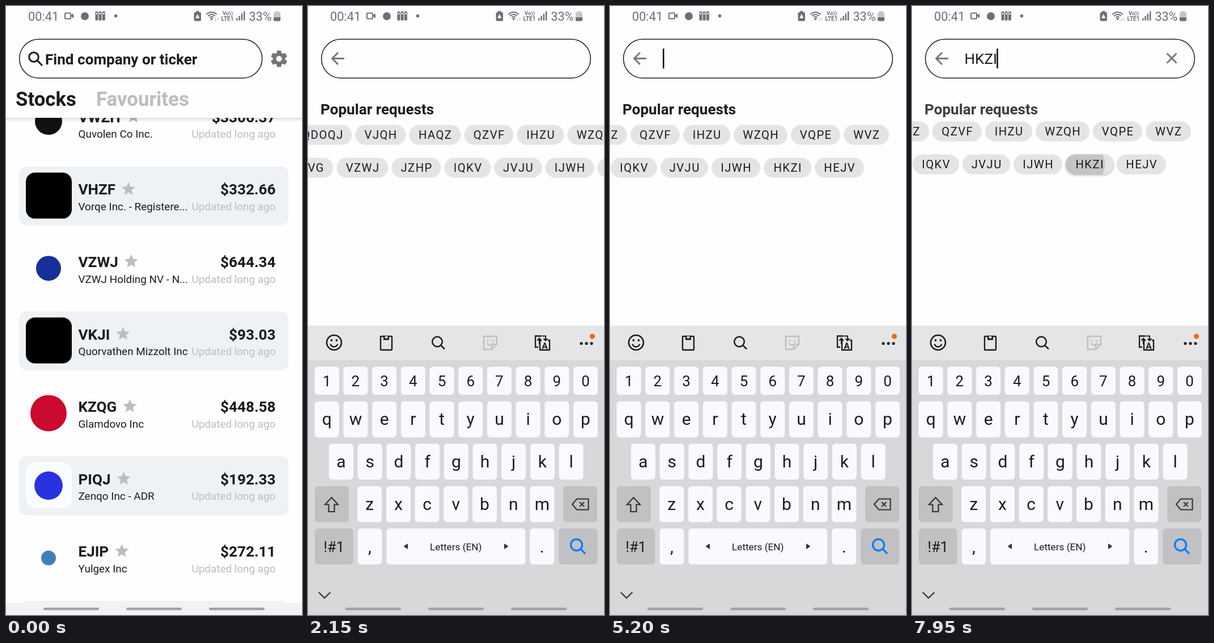
Write an HTML page with a canvas that moves like this. It is 522 px wide and 1073 px high and loops after 8000 ms.

```html
<!DOCTYPE html>
<html lang="en">
<head>
<meta charset="utf-8">
<title>Stock search</title>
<style>
html, body { margin: 0; width: 100%; height: 100%; overflow: hidden; background: #fefdff; }
canvas { display: block; width: 100vw; height: 100vh; }
</style>
</head>
<body>
<canvas id="stage" width="522" height="1073"></canvas>
<script>
const c = document.getElementById('stage').getContext('2d');
const LOOP = 8000;
const BG = '#fefdff', INK = '#1b1b1d', GREY = '#757577', PALE = '#bdbdc0', CARD = '#eef2f4';

const stocks = [
  { id: 'VWZH', name: 'Quvolen Co Inc.', price: '$3306.37', color: '#111', r: 24, dy: -4 },
  { id: 'VHZF', name: 'Vorqe Inc. - Registere...', price: '$332.66', color: '#000' },
  { id: 'VZWJ', name: 'VZWJ Holding NV - N...', price: '$644.34', color: '#16309a', r: 22 },
  { id: 'VKJI', name: 'Quorvathen Mizzolt Inc', price: '$93.03', color: '#000' },
  { id: 'KZQG', name: 'Glamdovo Inc', price: '$448.58', color: '#cc092f', r: 32 },
  { id: 'PIQJ', name: 'Zenqo Inc - ADR', price: '$192.33', color: '#2932e1', r: 25, tile: '#fbfcfe' },
  { id: 'EJIP', name: 'Yulgex Inc', price: '$272.11', color: '#3f7fb8', r: 13 },
  { id: 'QWHF', name: 'Ostrevan Inc', price: '$118.40', color: '#345', r: 20 }
];
const found = { id: 'VQPE', name: 'Vyqon Inc', price: '$483.61', color: '#f3200f', r: 26, dx: 4, dy: 2 };

const chipRows = [
  [['PKHQ', 91], ['QDOQ', 93], ['QDOQJ', 104], ['VJQH', 89], ['HAQZ', 91],
   ['QZVF', 87], ['IHZU', 83], ['WZQH', 95], ['VQPE', 87], ['WVZ', 80]],
  [['WFJI', 83], ['DZKH', 90], ['IZVG', 82], ['VZWJ', 91], ['JZHP', 87],
   ['IQKV', 82], ['JVJU', 84], ['IJWH', 86], ['HKZI', 84], ['HEJV', 87]]
];

const clamp = v => Math.min(1, Math.max(0, v));
const span = (t, a, b) => clamp((t - a) / (b - a));
const easeOut = p => 1 - (1 - p) ** 3;
const easeBoth = p => p * p * (3 - 2 * p);

function text(s, x, y, size, color = INK, weight = 400, align = 'left', gap = 0) {
  c.font = `${weight} ${size}px Roboto, sans-serif`;
  c.letterSpacing = gap + 'px';
  c.textAlign = align;
  c.fillStyle = color;
  c.fillText(s, x, y);
  const w = c.measureText(s).width;
  c.letterSpacing = '0px';
  return w;
}
function box(x, y, w, h, r, color) {
  c.beginPath();
  c.roundRect(x, y, w, h, r);
  c.fillStyle = color;
  c.fill();
}
function frame(x, y, w, h, r, color, lw) {
  c.beginPath();
  c.roundRect(x, y, w, h, r);
  c.strokeStyle = color;
  c.lineWidth = lw;
  c.stroke();
}
function disc(x, y, r, color) {
  c.beginPath();
  c.arc(x, y, r, 0, Math.PI * 2);
  c.fillStyle = color;
  c.fill();
}
function arc(x, y, r, color, lw, a = 0, b = Math.PI * 2) {
  c.beginPath();
  c.arc(x, y, r, a, b);
  c.strokeStyle = color;
  c.lineWidth = lw;
  c.stroke();
}
function line(color, lw, pts, closed) {
  c.beginPath();
  pts.forEach(p => c.lineTo(p[0], p[1]));
  if (closed) c.closePath();
  c.strokeStyle = color;
  c.lineWidth = lw;
  c.stroke();
}
function poly(color, pts) {
  c.beginPath();
  pts.forEach(p => c.lineTo(p[0], p[1]));
  c.closePath();
  c.fillStyle = color;
  c.fill();
}
function faded(alpha, draw) {
  if (alpha <= 0) return;
  c.save();
  c.globalAlpha *= alpha;
  draw();
  c.restore();
}
function lens(x, y, r, reach, color, lw) {
  arc(x, y, r, color, lw);
  line(color, lw, [[x + r * .72, y + r * .72], [x + reach, y + reach]]);
}

function star(x, y) {
  const pts = [];
  for (let i = 0; i < 10; i++) {
    const r = i % 2 ? 5.7 : 12.6, a = i * Math.PI / 5 - Math.PI / 2;
    pts.push([x + r * Math.cos(a), y + 1 + r * Math.sin(a)]);
  }
  poly(PALE, pts);
}
function gear(x, y) {
  c.save();
  c.translate(x, y);
  for (let i = 0; i < 3; i++) {
    box(-4, -14.5, 8, 29, 1.5, GREY);
    c.rotate(Math.PI / 3);
  }
  c.restore();
  disc(x, y, 11, GREY);
  disc(x, y, 5, BG);
}

function stockCard(s, y, shaded) {
  if (shaded) box(23, y, 475.5, 104, 14, CARD);
  if (s.tile) box(35, y + 11, 81, 81, 16, s.tile);
  if (s.r) disc(75 + (s.dx || 0), y + 52 + (s.dy || 0), s.r, s.color);
  else box(35, y + 11, 81, 81, 16, s.color);
  const w = text(s.id, 127.5, y + 49.7, 26.1, INK, 700);
  star(127.5 + w + 23, y + 39);
  text(s.price, 475.5, y + 49.7, 26.1, INK, 700, 'right');
  text(s.name, 127.5, y + 77.3, 18.9);
  text('Updated long ago', 475.5, y + 77.3, 18.9, PALE, 400, 'right');
}

function home(t) {
  const scroll = 5 * easeOut(span(t, 30, 400)) + easeBoth(span(t, 550, 850));
  stocks.forEach((s, i) => stockCard(s, 155 + 127.6 * i - scroll, i % 2));
  c.fillStyle = BG;
  c.fillRect(0, 0, 522, 197);
  const g = c.createLinearGradient(0, 197, 0, 204);
  g.addColorStop(0, 'rgba(0,0,0,.13)');
  g.addColorStop(1, 'rgba(0,0,0,0)');
  c.fillStyle = g;
  c.fillRect(0, 197, 522, 7);
  lens(49, 90, 8.3, 15, INK, 3);
  text('Find company or ticker', 69, 103, 26.1, INK, 700);
  gear(481.5, 93);
  text('Stocks', 17, 175.5, 34.8, INK, 700);
  text('Favourites', 159, 175.5, 34.8, PALE, 700);
  c.fillStyle = '#f2f2f4';
  c.fillRect(0, 1051, 522, 22);
}

function chipScroll(t) {
  return 317 * easeOut(span(t, 1830, 2650))
    + 134 * easeOut(span(t, 2780, 3550))
    + 34 * easeOut(span(t, 3680, 3900));
}

function chip(label, x, y, w, press) {
  if (press > 0) {
    c.save();
    c.shadowColor = 'rgba(0,0,0,.3)';
    c.shadowBlur = 4;
    c.shadowOffsetY = 1.5;
    box(x, y, w, 35, 17.5, '#e4e3e6');
    c.restore();
    c.save();
    c.beginPath();
    c.roundRect(x, y, w, 35, 17.5);
    c.clip();
    disc(x + 29, y + 18, 8 + 32 * press, 'rgba(0,0,0,.14)');
    c.restore();
  } else {
    box(x, y, w, 35, 17.5, '#e4e3e6');
  }
  text(label, x + w / 2 + .7, y + 24.4, 20.3, INK, 400, 'center', 1.4);
}

function popular(t, press, pressed) {
  const lift = 6 * easeBoth(span(press, 200, 350));
  faded(1 - lift * .025, () => text('Popular requests', 22, 191, 26.1, INK, 700));
  chipRows.forEach((row, j) => {
    let x = 23 - chipScroll(t);
    for (const [label, w] of row) {
      const hit = label === pressed ? span(press, 40, 350) : 0;
      if (x < 522 && x + w > 0) chip(label, x, 209.5 + 58 * j - lift, w, hit);
      x += w + 6;
    }
  });
}

function search(t) {
  const first = t < 7550;
  const press = t - (first ? 5200 : 7600);
  const pressed = press >= 0 ? (first ? 'VQPE' : 'HKZI') : '';
  const typed = press >= 200 && !(t >= 6700 && t < 7600) ? pressed : '';

  line(GREY, 2.9, [[64, 92.5], [43, 92.5]]);
  line(GREY, 2.9, [[53, 82], [42.7, 92.5], [53, 103]]);
  const w = typed ? text(typed, 92.5, 102, 26.1) : 0;
  const caret = t < 1800 || (t >= 2750 && t < 3250) || t >= 4250;
  if (caret) {
    c.fillStyle = '#111';
    c.fillRect(typed ? 91.5 + w : 93, 75, 2.6, 35);
  }
  if (typed) {
    line(GREY, 2.9, [[449.5, 83.5], [466.5, 100.5]]);
    line(GREY, 2.9, [[466.5, 83.5], [449.5, 100.5]]);
  }

  const gone = span(t, 5850, 6050) * (1 - span(t, 6900, 7200));
  const live = t < 6700 || t >= 7600;
  faded(1 - gone, () => popular(t, live ? press : -1, live ? pressed : ''));
  const card = easeBoth(span(t, 6000, 6300)) * (1 - span(t, 6700, 6900));
  faded(card, () => stockCard(found, 163.5, true));
}

function key(x, y, w, h, label, size, base, dark) {
  box(x, y, w, h, 6, dark ? '#c1c1c4' : '#faf9fd');
  if (label) text(label, x + w / 2, y + base, size, INK, 400, 'center');
}
function keyRow(letters, x, y, h, size, base) {
  [...letters].forEach((k, i) => key(x + i * 50.7, y, 43, h, k, size, base));
}

function toolbar() {
  arc(46, 30, 13, INK, 2.6);
  disc(41.5, 26, 1.9, INK);
  disc(50.5, 26, 1.9, INK);
  arc(46, 31, 6.5, INK, 2.4, .25, Math.PI - .25);

  frame(128, 19, 20, 24, 1.5, INK, 2.4);
  c.fillStyle = INK;
  c.fillRect(133, 18, 10, 7.5);
  c.fillStyle = '#e5e5e8';
  c.fillRect(135.5, 19, 5, 3.5);

  lens(228, 28.5, 8.8, 13, INK, 2.5);

  const soft = '#bebec1';
  line(soft, 2.4, [[310, 19], [333, 19], [333, 33], [324, 42], [310, 42]], true);
  line(soft, 2.2, [[324, 42], [324, 33], [333, 33]]);
  disc(317, 27, 1.6, soft);
  disc(326, 27, 1.6, soft);
  arc(321, 29, 5.5, soft, 2, .4, Math.PI - .4);

  line(INK, 2.3, [[406, 38], [401, 38], [401, 18.5], [412, 18.5]]);
  line(INK, 2.3, [[412, 26], [409, 26], [409, 43], [426, 43], [426, 26], [423, 26]]);
  text('A', 417.5, 40.5, 15, INK, 700, 'center');
  line(INK, 2, [[408, 33], [408, 23]]);
  line(INK, 2, [[404.5, 26.5], [408, 22.5], [411.5, 26.5]]);
  line(INK, 2, [[413, 18.5], [419, 18.5], [419, 26]]);
  line(INK, 2, [[415.5, 23], [419, 26.5], [422.5, 23]]);

  for (const x of [482, 491, 500]) disc(x, 31.5, 2.6, INK);
  disc(501.5, 19, 4.6, '#f2690d');
}

function keyboard(y) {
  c.save();
  c.translate(0, y);
  c.fillStyle = '#d8d8db';
  c.fillRect(0, 61, 522, 520);
  c.fillStyle = '#e5e5e8';
  c.fillRect(0, 0, 522, 61);
  toolbar();

  keyRow('1234567890', 11.7, 72.5, 49.5, 26, 34.5);
  keyRow('qwertyuiop', 11.7, 133.5, 63.5, 30, 41.5);
  keyRow('asdfghjkl', 37, 208, 63.5, 30, 41.5);
  keyRow('zxcvbnm', 87.2, 283, 63.5, 30, 41.5);

  key(12, 283, 60, 63.5, '', 0, 0, true);
  line('#333', 2.2, [[41.5, 303], [53, 315.5], [46.5, 315.5], [46.5, 328],
    [36.5, 328], [36.5, 315.5], [30, 315.5]], true);
  key(450, 283, 60, 63.5, '', 0, 0, true);
  line('#333', 2.1, [[466, 315], [474, 305.5], [494.5, 305.5], [494.5, 324.5], [474, 324.5]], true);
  line('#333', 2, [[479, 311], [487, 319]]);
  line('#333', 2, [[487, 311], [479, 319]]);

  key(12, 357.5, 67.5, 63.5, '!#1', 25.5, 41, true);
  key(87.7, 357.5, 42.7, 63.5, ',', 30, 42);
  key(138.3, 357.5, 245, 63.5, 'Letters (EN)', 17.2, 38.5);
  poly('#333', [[168.5, 389], [176, 384], [176, 394]]);
  poly('#333', [[353.5, 389], [346, 384], [346, 394]]);
  key(391.3, 357.5, 42.7, 63.5, '.', 30, 42);
  key(442.3, 357.5, 68, 63.5, '', 0, 0, true);
  lens(473.5, 386.5, 10, 15.5, '#0c7df5', 3.3);
  c.restore();
}

function statusBar() {
  const ash = '#6f6f73';
  text('00:41', 39, 25.5, 21.8, ash);
  frame(104, 12.5, 10, 10, 1.5, ash, 2);
  poly(ash, [[114, 17], [119, 13], [119, 22]]);
  disc(139, 18, 7, ash);
  for (const x of [157.5, 163.7, 169.9]) {
    box(x, 9.5, 5, 16, 1.5, ash);
    box(x + 1.3, 12, 2.4, 3, 1, BG);
  }
  disc(193.5, 17.5, 2.8, ash);

  box(331.5, 11, 12.5, 15.5, 2, ash);
  box(335, 8.8, 5.5, 3, 1, ash);
  poly(BG, [[337.7, 14], [341.3, 21.5], [334.2, 21.5]]);
  for (const r of [4.5, 8.5, 12.5]) arc(362.5, 23.5, r, ash, 1.9, -2.4, -.75);
  disc(362.5, 23, 2, ash);
  text('↓↑', 367, 26, 9, ash, 700);
  text('Vo))', 382, 16, 9.5, ash, 700);
  text('LTE1', 379.5, 25.5, 10, ash, 700);
  [4, 8, 12, 16].forEach((h, i) => box(406 + i * 4.3, 25.5 - h, 2.5, h, .5, ash));
  text('33%', 428.5, 25.5, 21.5, ash);
  box(472, 11, 12, 15.5, 2, '#c6c6c9');
  box(475, 9, 6, 3, 1, '#c6c6c9');
  box(472, 20, 12, 6.5, [0, 0, 2, 2], ash);
}

function draw(t) {
  c.globalAlpha = 1;
  c.fillStyle = BG;
  c.fillRect(0, 0, 522, 1073);

  const open = easeBoth(span(t, 1000, 1250));
  faded(1 - open, () => home(t));
  faded(open, () => search(t));
  frame(23.7, 58.5, 428 + 46.6 * open, 68.5, 34.2, INK, 1.5);

  if (t > 1050) {
    const rise = easeOut(span(t, 1050, 1405));
    keyboard(563 + 510 * (1 - rise));
    if (rise > .9) line('#3a3a3c', 2.4, [[19, 1033], [29, 1043], [39.5, 1033]]);
  }
  statusBar();
  for (const x of [66, 212, 358]) box(x, 1060, 98, 4.6, 2.3, '#a2a2a5');
}

const start = performance.now();
function tick() {
  draw((performance.now() - start) % LOOP);
  requestAnimationFrame(tick);
}
tick();
</script>
</body>
</html>
```
